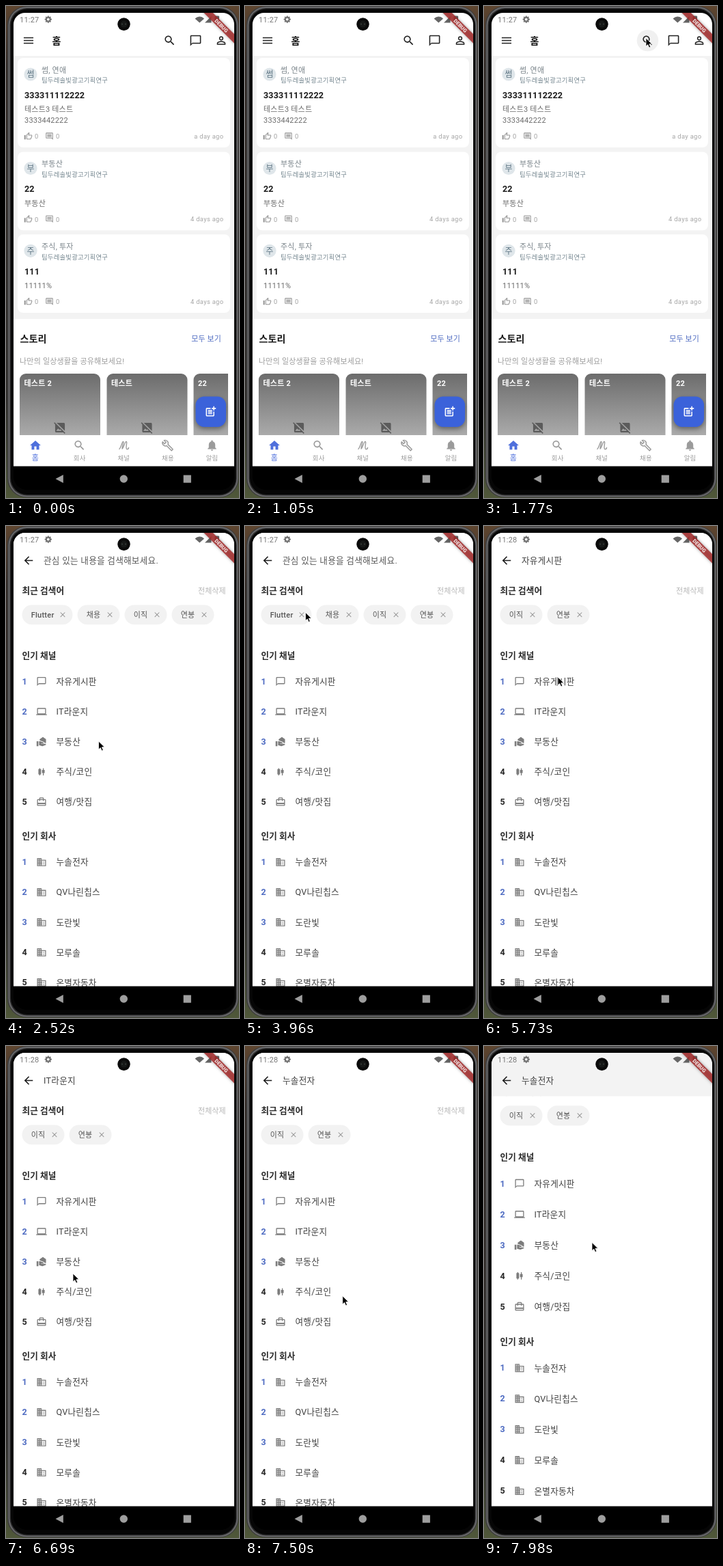
Write an HTML page with a canvas that moves like this. It is 341 px wide and 720 px high and loops after 8 s.

```html
<!DOCTYPE html>
<html lang="ko">
<head>
<meta charset="utf-8">
<title>검색 화면</title>
<style>
html, body { margin: 0; width: 100%; height: 100%; overflow: hidden; background: #2b2826; }
canvas { display: block; width: 341px; height: 720px; }
</style>
</head>
<body>
<canvas id="stage"></canvas>
<script>
const W = 341, H = 720, LOOP = 8000;
const canvas = document.getElementById('stage');
const dpr = window.devicePixelRatio || 1;
canvas.width = W * dpr;
canvas.height = H * dpr;
const ctx = canvas.getContext('2d');
const FONT = 'Roboto, "Noto Sans CJK KR", "Noto Sans CJK", "Noto Sans CJK JP", sans-serif';
const BLUE = '#4f6cc2';

// Icons on a 24-unit grid
const ICONS = {
  menu: 'M3 18h18v-2H3zM3 13h18v-2H3zM3 6v2h18V6z',
  search: 'M15.5 14h-.79l-.28-.27C15.41 12.59 16 11.11 16 9.5 16 5.91 13.09 3 9.5 3S3 5.91 3 9.5 5.91 16 9.5 16c1.61 0 3.09-.59 4.23-1.57l.27.28v.79l5 4.99L20.49 19zm-6 0C7.01 14 5 11.99 5 9.5S7.01 5 9.5 5 14 7.01 14 9.5 11.99 14 9.5 14z',
  chat: 'M20 2H4c-1.1 0-2 .9-2 2v18l4-4h14c1.1 0 2-.9 2-2V4c0-1.1-.9-2-2-2zm0 14H6l-2 2V4h16z',
  person: 'M12 5.9a2.1 2.1 0 1 1 0 4.2a2.1 2.1 0 1 1 0-4.2m0 9c2.97 0 6.1 1.46 6.1 2.1v1.1H5.9V17c0-.64 3.13-2.1 6.1-2.1M12 4a4 4 0 1 0 0 8a4 4 0 1 0 0-8zm0 9c-2.67 0-8 1.34-8 4v3h16v-3c0-2.66-5.33-4-8-4z',
  home: 'M10 20v-6h4v6h5v-8h3L12 3 2 12h3v8z',
  back: 'M20 11H7.83l5.59-5.59L12 4l-8 8 8 8 1.41-1.41L7.83 13H20z',
  laptop: 'M20 18c1.1 0 2-.9 2-2V6c0-1.1-.9-2-2-2H4c-1.1 0-2 .9-2 2v10c0 1.1.9 2 2 2H0v2h24v-2zM4 6h16v10H4z',
  bell: 'M12 22c1.1 0 2-.9 2-2h-4c0 1.1.89 2 2 2zm6-6v-5c0-3.07-1.64-5.64-4.5-6.32V4a1.5 1.5 0 0 0-3 0v.68C7.63 5.36 6 7.92 6 11v5l-2 2v1h16v-1z',
  office: 'M12 7V3H2v18h20V7zM6 19H4v-2h2zm0-4H4v-2h2zm0-4H4V9h2zm0-4H4V5h2zm4 12H8v-2h2zm0-4H8v-2h2zm0-4H8V9h2zm0-4H8V5h2zm10 12h-8v-2h2v-2h-2v-2h2v-2h-2V9h8zm-2-8h-2v2h2zm0 4h-2v2h2z',
  thumb: 'M9 21h9c.83 0 1.54-.5 1.84-1.22l3.02-7.05c.09-.23.14-.47.14-.73v-2c0-1.1-.9-2-2-2h-6.31l.95-4.57.03-.32c0-.41-.17-.79-.44-1.06L14.17 1 7.58 7.59C7.22 7.95 7 8.45 7 9v10c0 1.1.9 2 2 2zM9 9l4.34-4.34L12 10h9v2l-3 7H9zM1 9h4v12H1z',
  comment: 'M22 4c0-1.1-.9-2-2-2H4c-1.1 0-2 .9-2 2v12c0 1.1.9 2 2 2h14l4 4zM20 4v13.17L18.83 16H4V4zM6 12h12v2H6zM6 9h12v2H6zM6 6h12v2H6z',
  close: 'M19 6.41L17.59 5 12 10.59 6.41 5 5 6.41 10.59 12 5 17.59 6.41 19 12 13.41 17.59 19 19 17.59 13.41 12z',
  estate: 'M1 11h4v11H1zM8 9.5V6.5l7-5 7 5V15h-3l-1-2-9-3.5zM6.5 11H9l7 2.6c1.2.5 1.2 2 0 2.4h-4l-2-.8 2 1.8h8c1.3 0 2 .8 2 2l-8 3-7.5-2z',
  candles: 'M9 4H7v2H5v12h2v2h2v-2h2V6H9zM19 8h-2V4h-2v4h-2v7h2v5h2v-5h2z',
  travel: 'M20 6h-3V4c0-1.1-.9-2-2-2H9c-1.1 0-2 .9-2 2v2H4c-1.1 0-2 .9-2 2v11c0 1.1.9 2 2 2h16c1.1 0 2-.9 2-2V8c0-1.1-.9-2-2-2zM9 4h6v2H9zm11 15H4v-2h16zm0-5H4V8h3v2h2V8h6v2h2V8h3z',
  post: 'M17 19H5V7h7V5H5c-1.1 0-2 .9-2 2v12c0 1.1.9 2 2 2h12c1.1 0 2-.9 2-2v-7h-2zM19 2h-2v3h-3v2h3v3h2V7h3V5h-3zM7 9h8v2H7zM7 12h8v2H7zM7 15h8v2H7z',
  noImage: 'M21.9 21.9L2.1 2.1.69 3.51 3 5.83V19c0 1.1.9 2 2 2h13.17l2.31 2.31zM5 18l3.5-4.5 2.5 3.01L12.17 15l3 3zm16 .17L5.83 3H19c1.1 0 2 .9 2 2z',
  wrench: 'M22 19.5l-9.3-9.3c.9-2.3.4-4.6-1.3-6.3C9.7 2.2 7.3 1.8 5.3 2.5L9 6.2 6.2 9 2.5 5.3C1.8 7.3 2.2 9.7 3.9 11.4c1.7 1.7 4 2.2 6.3 1.3l9.3 9.3z',
  script: 'M2 20C6 18 8 4 10.5 4S8 14 8.5 19C12 16 14 4 17 4S14 20 19 20C21 20 22 18 22 16'
};
const paths = {};
for (const name in ICONS) paths[name] = new Path2D(ICONS[name]);

function icon(name, cx, cy, size, color, line) {
  const k = size / 24;
  ctx.save();
  ctx.translate(cx - size / 2, cy - size / 2);
  ctx.scale(k, k);
  if (line) {
    ctx.strokeStyle = color;
    ctx.lineWidth = line;
    ctx.lineJoin = 'round';
    ctx.stroke(paths[name]);
  } else {
    ctx.fillStyle = color;
    ctx.fill(paths[name], 'evenodd');
  }
  ctx.restore();
}

// y is the optical middle of the line
function text(str, x, y, size, color, { weight = 400, gap = 0.2, align = 'left' } = {}) {
  ctx.font = `${weight} ${size}px ${FONT}`;
  ctx.letterSpacing = gap + 'px';
  ctx.textAlign = align;
  ctx.fillStyle = color;
  ctx.fillText(str, x, y + size * 0.35);
}

function rect(x, y, w, h, color) {
  ctx.fillStyle = color;
  ctx.fillRect(x, y, w, h);
}

function round(x, y, w, h, r, color) {
  ctx.beginPath();
  ctx.roundRect(x, y, w, h, r);
  ctx.fillStyle = color;
  ctx.fill();
}

function disc(x, y, r, color) {
  ctx.beginPath();
  ctx.arc(x, y, r, 0, Math.PI * 2);
  ctx.fillStyle = color;
  ctx.fill();
}

function poly(points, color) {
  ctx.beginPath();
  points.forEach(([x, y]) => ctx.lineTo(x, y));
  ctx.closePath();
  ctx.fillStyle = color;
  ctx.fill();
}

const clamp = v => Math.max(0, Math.min(1, v));
const ease = p => p * p * (3 - 2 * p);
const ramp = (t, from, to) => ease(clamp((t - from) / (to - from)));

const POSTS = [
  { y: 76, mark: '썸', topic: '썸, 연애', title: '333311112222', body: ['테스트3 테스트', '3333442222'], age: 'a day ago' },
  { y: 213.5, mark: '부', topic: '부동산', title: '22', body: ['부동산'], age: '4 days ago' },
  { y: 334.3, mark: '주', topic: '주식, 투자', title: '111', body: ['11111%'], age: '4 days ago' }
];

function drawPost({ y, mark, topic, title, body, age }) {
  const foot = y + 82 + body.length * 16.3;
  round(17, y, 311, foot + 16.5 - y, 8, '#fff');
  disc(36, y + 24, 9.6, '#dfe6ea');
  text(mark, 36, y + 24, 12, '#5f7684', { align: 'center', gap: 0, weight: 500 });
  text(topic, 52, y + 18, 11, '#7a848a');
  text('팀두레솔빛광고기획연구', 52, y + 33.2, 9.4, '#74868f');
  text(title, 27, y + 54.5, 12.6, '#1c1c1c', { weight: 700, gap: 0.12 });
  body.forEach((line, i) => text(line, 27, y + 75.3 + i * 16.3, 11, '#6c6c6c'));
  icon('thumb', 32.5, foot, 12.6, '#959595');
  text('0', 42, foot + 0.5, 9.4, '#a0a0a0');
  icon('comment', 63.5, foot, 12.6, '#959595');
  text('0', 73, foot + 0.5, 9.4, '#a0a0a0');
  text(age, 318.3, foot + 0.3, 9.4, '#a6a6a6', { align: 'right', gap: 0.31 });
}

function drawStory(x, title, hasIcon) {
  const shade = ctx.createLinearGradient(0, 538, 0, 632);
  shade.addColorStop(0, '#6c6c6c');
  shade.addColorStop(1, '#adadad');
  round(x, 538, 118, 110, 9, shade);
  text(title, x + 6.5, 552.5, 11, '#fff', { weight: 700 });
  if (hasIcon) icon('noImage', x + 59, 617, 18.9, '#5b5b5b');
}

function drawHome(t) {
  rect(11, 10, 323, 664, '#fff');
  rect(11, 73, 323, 385, '#f3f3f3');
  if (t > 1520) disc(239.5, 50.5, 15.8, `rgba(0,0,0,${0.06 * ramp(t, 1520, 1600)})`);
  icon('menu', 33, 50.5, 18.9, '#222');
  text('홈', 67.5, 51, 14, '#111', { weight: 700 });
  icon('search', 239.5, 50.5, 18.9, '#222');
  icon('chat', 277.5, 50.5, 18.9, '#222');
  icon('person', 315, 50.5, 18.9, '#222');
  POSTS.forEach(drawPost);

  text('스토리', 20.5, 487.5, 14.1, '#1c1c1c', { weight: 700, gap: 0 });
  text('모두 보기', 315, 487, 11, BLUE, { align: 'right', gap: 0.1, weight: 500 });
  text('나만의 일상생활을 공유해보세요!', 20, 520.5, 11, '#9c9c9c');
  ctx.save();
  ctx.beginPath();
  ctx.rect(20, 530, 305, 98);
  ctx.clip();
  drawStory(20, '테스트 2', true);
  drawStory(147.5, '테스트', true);
  drawStory(274.5, '22', false);
  ctx.restore();

  ctx.save();
  ctx.shadowColor = 'rgba(0,0,0,.4)';
  ctx.shadowBlur = 7 * dpr;
  ctx.shadowOffsetY = 3 * dpr;
  round(277.5, 571.5, 44.5, 44.5, 12.5, '#3b62da');
  ctx.restore();
  icon('post', 299.5, 593.5, 18.5, '#fff');

  rect(11, 628, 323, 46, '#fff');
  icon('home', 43, 643, 18.9, '#4f70dc');
  icon('search', 107.5, 643, 18.9, '#9b9b9b');
  icon('script', 172.5, 643, 17, '#9b9b9b', 1.9);
  icon('wrench', 236.5, 643, 18.5, '#9b9b9b', 1.9);
  icon('bell', 301.5, 643, 18.9, '#9b9b9b');
  text('홈', 43, 661, 11, '#4f70dc', { align: 'center' });
  ['회사', '채널', '채용', '알림'].forEach((label, i) =>
    text(label, 107.7 + i * 64.6, 661.5, 9.4, '#9b9b9b', { align: 'center' }));
}

const CHANNELS = [['자유게시판', 'chat'], ['IT라운지', 'laptop'], ['부동산', 'estate'], ['주식/코인', 'candles'], ['여행/맛집', 'travel']];
const FIRMS = ['누솔전자', 'QV나린칩스', '도란빛', '모루솔', '온별자동차'].map(name => [name, 'office']);
// Label, width, time of removal
const CHIPS = [['Flutter', 74, 4060], ['채용', 62, 4830], ['이직', 62, LOOP], ['연봉', 62, LOOP]];
// Latest tapped entry first
const QUERIES = [[7290, FIRMS[0][0]], [6240, CHANNELS[1][0]], [5500, CHANNELS[0][0]]];

function drawRank(title, rows, top) {
  text(title, 23.5, top, 12.6, '#2a2a2a', { weight: 700, gap: 0.1 });
  rows.forEach(([name, glyph], i) => {
    const y = top + 38.3 + i * 44.05;
    text(String(i + 1), 23.5, y - 0.3, 12.6, i < 3 ? BLUE : '#262626', { weight: 700 });
    icon(glyph, 52, y, 15.7, '#7c7c7c');
    text(name, 73.5, y + 0.2, 12.6, '#404040', { gap: 0.25 });
  });
}

function drawSearch(t) {
  rect(11, 10, 323, 664, '#fff');
  ctx.save();
  ctx.beginPath();
  ctx.rect(11, 73, 323, 601);
  ctx.clip();
  // Scrolls to its end, then stretches away from the bottom edge
  const stretch = 1 + 0.0205 * ramp(t, 7800, 7970);
  ctx.translate(0, 674);
  ctx.scale(1, stretch);
  ctx.translate(0, -674 - 16.5 * ramp(t, 7600, 7830));
  text('최근 검색어', 23.5, 95, 12.6, '#2a2a2a', { weight: 700, gap: 0.1 });
  text('전체삭제', 321.5, 95.5, 11, '#b6b6b6', { align: 'right', gap: 0 });
  let x = 23.5;
  for (const [label, w, gone] of CHIPS) {
    if (t >= gone) continue;
    round(x, 115.5, w, 28.7, 14.3, '#f2f2f2');
    text(label, x + 13.2, 130, 11, '#555', { gap: 0.25, weight: label === 'Flutter' ? 500 : 400 });
    icon('close', x + w - 14.5, 129.8, 12.6, '#999');
    x += w + 7;
  }
  drawRank('인기 채널', CHANNELS, 189.2);
  drawRank('인기 회사', FIRMS, 453.5);
  ctx.restore();

  const tint = Math.round(255 - 12 * ramp(t, 7600, 7760));
  rect(11, 10, 323, 63.5, `rgb(${tint},${tint},${tint})`);
  icon('back', 33, 50.5, 18.9, '#1c1c1c');
  const query = QUERIES.find(([at]) => t >= at);
  text(query ? query[1] : '관심 있는 내용을 검색해보세요.', 55, 50.6, 12.6, query ? '#404040' : '#585858', { gap: 0.28 });
}

function drawStatus(t) {
  text(t < 4500 ? '11:27' : '11:28', 20, 20, 11, '#777', { gap: 0.2 });
  ctx.strokeStyle = '#707070';
  ctx.lineWidth = 2.3;
  ctx.beginPath();
  ctx.arc(61.8, 19.6, 3, 0, Math.PI * 2);
  ctx.stroke();
  for (let i = 0; i < 8; i++) {
    const a = i * Math.PI / 4;
    disc(61.8 + 4.3 * Math.cos(a), 19.6 + 4.3 * Math.sin(a), 1, '#707070');
  }
  ctx.beginPath();
  ctx.moveTo(283.3, 24.5);
  ctx.arc(283.3, 24.5, 9, -Math.PI * 0.77, -Math.PI * 0.23);
  ctx.closePath();
  ctx.fillStyle = '#666';
  ctx.fill();
  poly([[291, 24.5], [300.5, 24.5], [300.5, 15]], '#666');
  round(305.5, 14.5, 6.5, 10, 1, '#666');
}

function drawBanner() {
  ctx.save();
  ctx.translate(334, 10);
  ctx.rotate(Math.PI / 4);
  ctx.shadowColor = 'rgba(0,0,0,.45)';
  ctx.shadowBlur = 4 * dpr;
  rect(-34, 22, 68, 9.4, 'rgba(168,42,42,.82)');
  ctx.shadowColor = 'transparent';
  text('DEBUG', 0, 26.7, 7.6, '#f4e4e4', { weight: 900, gap: 0, align: 'center' });
  ctx.restore();
}

function drawBody() {
  const wall = ctx.createLinearGradient(0, 0, 0, H);
  wall.addColorStop(0, '#5f4630');
  wall.addColorStop(0.12, '#332a26');
  wall.addColorStop(0.8, '#302e2c');
  wall.addColorStop(1, '#50583a');
  rect(0, 0, W, H, wall);
  round(2, 0, 338.5, 719.5, 28, '#3c3c3c');
  round(3.5, 1, 336, 717.5, 27, '#68686a');
  round(5.5, 3, 332, 713.5, 25, '#2c2c2d');
  round(7, 4.5, 329.5, 710.5, 24, '#060606');
}

function drawNav() {
  rect(11, 673.5, 323, 35, '#000');
  poly([[72.5, 692], [83.8, 686], [83.8, 698]], '#9e9e9e');
  disc(172.3, 692, 5.7, '#9e9e9e');
  rect(259.7, 686.5, 11.2, 11.2, '#9e9e9e');
}

function drawCamera() {
  disc(172.5, 26.6, 9.3, '#0a0a0a');
  disc(172.5, 26.6, 5, '#161817');
  disc(170, 26.6, 1, '#3a403c');
  disc(175, 26.6, 1, '#3a403c');
}

// Pointer stops: time, x, y
const TRAIL = [
  [1000, 346, 190], [1520, 237, 47], [2140, 237, 47], [2500, 135.5, 315],
  [3390, 135.5, 315], [3900, 88.5, 126.5], [3975, 88.5, 126.5], [4050, 84, 128],
  [4400, 84, 128], [4760, 71, 129], [4980, 71, 129], [5420, 108, 221],
  [5930, 108, 221], [6180, 104, 268], [6330, 104, 268], [6660, 98, 333],
  [6760, 98, 333], [7180, 102, 489], [7330, 102, 489], [7570, 153, 335],
  [7960, 158, 287.5], [LOOP, 158, 287.5]
];

function drawPointer(t) {
  const next = TRAIL.findIndex(([at]) => at > t);
  if (next < 1) return;
  const [t0, x0, y0] = TRAIL[next - 1], [t1, x1, y1] = TRAIL[next];
  const p = ramp(t, t0, t1);
  ctx.save();
  ctx.translate(x0 + (x1 - x0) * p, y0 + (y1 - y0) * p);
  poly([[0, 0], [0, 12], [2.8, 9.6], [4.7, 14], [6.8, 13.1], [4.9, 8.8], [8.7, 8.6]], '#000');
  ctx.strokeStyle = '#fff';
  ctx.lineWidth = 0.8;
  ctx.stroke();
  ctx.restore();
}

function draw(t) {
  ctx.setTransform(dpr, 0, 0, dpr, 0, 0);
  drawBody();
  ctx.save();
  ctx.beginPath();
  ctx.roundRect(11, 10, 323, 698, [17, 17, 20, 20]);
  ctx.clip();
  const enter = ramp(t, 1860, 2140);
  if (enter < 1) drawHome(t);
  if (enter > 0) {
    const k = 0.9 + 0.1 * enter;
    ctx.save();
    ctx.globalAlpha = clamp(enter * 1.6);
    ctx.translate(172.5, 342);
    ctx.scale(k, k);
    ctx.translate(-172.5, -342);
    drawSearch(t);
    ctx.restore();
  }
  drawStatus(t);
  drawBanner();
  drawNav();
  ctx.restore();
  drawCamera();
  drawPointer(t);
}

const start = performance.now();
function tick() {
  draw((performance.now() - start) % LOOP);
  requestAnimationFrame(tick);
}
tick();
</script>
</body>
</html>
```
